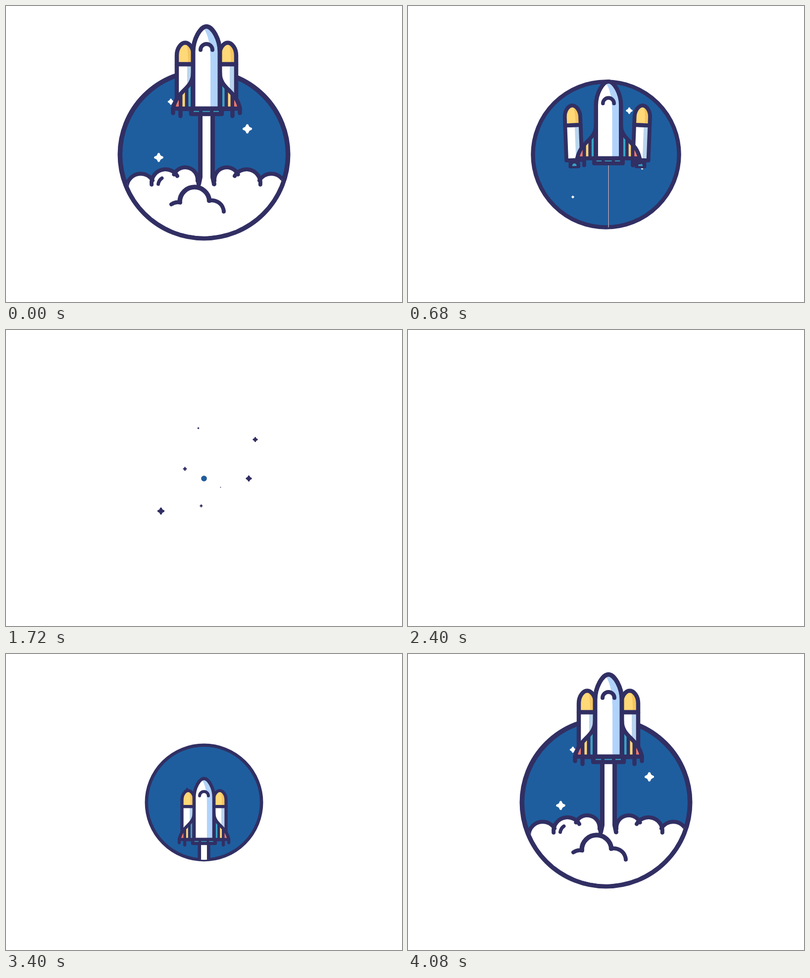
These frames come from a looping animation (800 by 600 pixels, 4.12 s). An HTML page with a canvas:

```html
<!DOCTYPE html>
<html lang="en">
<head>
<meta charset="utf-8">
<title>Shuttle launch</title>
<style>
html, body { margin: 0; width: 100%; height: 100%; overflow: hidden; background: #fff }
canvas { display: block }
</style>
</head>
<body>
<canvas id="stage" width="800" height="600"></canvas>
<script>
const ctx = document.getElementById('stage').getContext('2d');
const NAVY = '#312f63', BLUE = '#1e5e9f', WHITE = '#fff', SKY = '#b1d3fb',
      TEAL = '#36a3c6', RED = '#f4796b', YELLOW = '#ffd877', AMBER = '#f4c55f';
const LOOP = 4120, LAST = 4080, STEP = 40, CX = 400, CY = 301;
const rad = deg => deg * Math.PI / 180;
const ramp = (t, from, to) => Math.min(1, Math.max(0, (t - from) / (to - from)));
const smooth = (t, from, to) => {
  const p = ramp(t, from, to);
  return p * p * (3 - 2 * p);
};

// Smooth monotone curve through [time, value] keys
function track(t, ...keys) {
  const last = keys.length - 1;
  if (t <= keys[0][0]) return keys[0][1];
  if (t >= keys[last][0]) return keys[last][1];
  const slope = i => (keys[i + 1][1] - keys[i][1]) / (keys[i + 1][0] - keys[i][0]);
  const tangent = i => {
    if (i === 0 || i === last) return 0;
    const a = slope(i - 1), b = slope(i);
    return a * b <= 0 ? 0 : 2 * a * b / (a + b);
  };
  const i = keys.findIndex(k => k[0] > t) - 1;
  const [t0, v0] = keys[i], [t1, v1] = keys[i + 1];
  const h = t1 - t0, u = (t - t0) / h, v = 1 - u;
  return v0 * (1 + 2 * u) * v * v + v1 * u * u * (3 - 2 * u) +
    h * u * v * (tangent(i) * v - tangent(i + 1) * u);
}

function fill(path, color) { ctx.fillStyle = color; ctx.fill(path); }
function line(path, width, color = NAVY) {
  ctx.strokeStyle = color;
  ctx.lineWidth = width;
  ctx.stroke(path);
}
function scoped(draw) { ctx.save(); draw(); ctx.restore(); }
function within(path, draw) { scoped(() => { ctx.clip(path); draw(); }); }
function disc(r) {
  const p = new Path2D();
  p.arc(CX, CY, Math.max(r, 0), 0, 2 * Math.PI);
  return p;
}

const SPARK = new Path2D('M0-.72Q.14-.14 .72 0Q.14 .14 0 .72Q-.14 .14-.72 0Q-.14-.14 0-.72Z');
function star(x, y, r, color) {
  if (r < .2) return;
  scoped(() => {
    ctx.translate(x, y);
    ctx.scale(r, r);
    fill(SPARK, color);
    line(SPARK, .54, color);
  });
}

// Stars stream down past the shuttle, swelling mid-way
const drifting = [[333, 194], [487.5, 249], [308.5, 307], [473, 131], [346, -39], [447, 19], [366, 471]];
function drawDrifting(t, radius) {
  for (const [x, y0] of drifting) {
    const y = y0 + .284 * t;
    const r = 10 * radius / 174.5 * Math.sin(Math.PI * ramp(y, 130, 420));
    star(x, y, r, t < -400 ? NAVY : WHITE);
  }
}

// Stars burst outwards, swelling one after another and vanishing together
const burst = [[-87, 66], [90.5, 0], [103.5, -79], [-38.5, -19.5], [-5.7, 55.5], [-11.5, -102], [33.5, 18]];
function drawBurst(t) {
  const reach = track(t, [1400, 0], [1720, 1], [2240, 1.95]);
  burst.forEach(([dx, dy], i) => {
    const size = Math.min(ramp(t - 45 * i, 1400, 1720), ramp(t, 2390, 2230));
    star(CX + dx * reach, CY + dy * reach, 7.3 * size, NAVY);
  });
}

const DOME = new Path2D('M-17 48V30C-17 15-8 4.5 0 4.5S17 15 17 30V48Z');
const DOME_SHADE = new Path2D('M0 0C6 12 6 30 6 48H20V0Z');
const TUBE = new Path2D('M-17 48H17V125H-17Z');
const TUBE_SHADE = new Path2D('M4 48H17V125H4Z');
const NOZZLE = new Path2D('M-8 125H8L9 139H-9Z');
const NOZZLE_GLOW = new Path2D('M-5 138A5 6 0 0 1 5 138Z');
function drawBooster(x, y, scale, angle) {
  scoped(() => {
    ctx.translate(x, y);
    ctx.rotate(angle);
    ctx.scale(scale, scale);
    fill(NOZZLE, NAVY);
    line(NOZZLE, 8);
    fill(NOZZLE_GLOW, TEAL);
    fill(DOME, YELLOW);
    within(DOME, () => fill(DOME_SHADE, AMBER));
    fill(TUBE, WHITE);
    fill(TUBE_SHADE, '#b9d5ee');
    line(DOME, 8.5);
    line(TUBE, 8.5);
  });
}

const BODY = new Path2D('M-27 171V56C-27 30-12 4.5 0 4.5S27 30 27 56V171Z');
const BODY_SHADE = new Path2D('M-7 6C4 20 8 45 8 70V171H30V0Z');
const HATCH = new Path2D('M-12 52A12 12 0 0 1 12 52');
const WING = new Path2D('M-27 98C-27 132-60 133-67.5 171H-27Z');
const LEGS = new Path2D('M-67.5 171V180M-52.5 171V186');
const ENGINE = new Path2D('M-31 171H31V182H-31Z');
const VENTS = new Path2D('M-26 176.7H-15M-8 176.7H7M14 176.7H25');
function stripe(x, width, color) {
  ctx.fillStyle = color;
  ctx.fillRect(x, 98, width, 73);
}
function drawShuttle(x, y, scale) {
  scoped(() => {
    ctx.translate(x, y);
    ctx.scale(scale, scale);
    for (const side of [1, -1]) scoped(() => {
      ctx.scale(side, 1);
      fill(WING, NAVY);
      within(WING, () => {
        stripe(-70, 14, RED);
        stripe(-48.5, 5, YELLOW);
        stripe(-36.5, 4.5, TEAL);
      });
      line(WING, 8.5);
      line(LEGS, 8.5);
    });
    fill(ENGINE, NAVY);
    line(ENGINE, 8.5);
    fill(BODY, WHITE);
    within(BODY, () => fill(BODY_SHADE, SKY));
    line(BODY, 9);
    line(HATCH, 8);
    ctx.lineCap = 'butt';
    line(VENTS, 2, TEAL);
  });
}

function puff(cx, cy, r, from, to) {
  const edge = new Path2D();
  edge.arc(cx, cy, r, rad(from), rad(to));
  const area = new Path2D(edge);
  area.lineTo(cx + r * Math.cos(rad(to)), 900);
  area.lineTo(cx + r * Math.cos(rad(from)), 900);
  return { edge, area };
}

// One bank of puffs, outermost first: x from the middle, y, radius, arc angles
const bank = [[-132, 368, 28, 180, 329], [-82, 359, 28, 174, 329], [-42, 352, 25, 205, 365]];
function drawClouds(drift, fall, gap, bottom) {
  const shrink = 1 - .07 * Math.min(drift, 1);
  const puffs = bank.map(([x, y, r, from, to], i) =>
    puff(x - 2 * (i + 1) * drift, y + 11 * (i + 1) * drift + fall, r * shrink, from, to));
  const slope = `M${-17 - 7 * drift} ${354 + 33 * drift + fall}L${-gap} ${bottom}`;
  const valley = new Path2D(slope + 'H5V900H-60Z');
  for (const side of [1, -1]) scoped(() => {
    ctx.translate(404, 0);
    ctx.scale(side, 1);
    fill(valley, WHITE);
    for (const p of puffs) fill(p.area, WHITE);
    for (const p of puffs) line(p.edge, 8);
    line(new Path2D(slope), 7);
  });
  scoped(() => {
    ctx.translate(-3 * drift, 20 * drift + fall);
    line(new Path2D('M307.5 361Q309 353 315 349'), 7);
  });
}

function drawFrontCloud(drift, fall) {
  const top = puff(381 - drift, 397 + 22 * drift + fall, 30 - Math.min(drift, 1), 180, 355);
  fill(top.area, WHITE);
  scoped(() => {
    ctx.translate(-2 * drift, 15 * drift + fall);
    line(puff(416, 418, 24, 255, 357).edge, 8);
    line(new Path2D('M334 402Q343 396 352 398.5'), 8);
  });
  line(top.edge, 9.5);
}

function drawTrail(x, half, gap, top, bottom, width) {
  const bend = bottom - 14;
  const left = `M${x - half} ${top}V${bend}L${x - gap} ${bottom}`;
  const right = `M${x + half} ${top}V${bend}L${x + gap} ${bottom}`;
  fill(new Path2D(`${left}H${x + gap}L${x + half} ${bend}V${top}Z`), WHITE);
  line(new Path2D(left + right), width);
}

function render(ms) {
  // Launch intro runs on negative time, so the settled pose sits at zero
  let t = Math.floor(ms % LOOP / STEP) * STEP;
  if (t > 3000) t = Math.min(t, LAST) - LAST;

  ctx.fillStyle = WHITE;
  ctx.fillRect(0, 0, 800, 600);
  ctx.lineCap = ctx.lineJoin = 'round';
  drawBurst(t);

  const radius = (1 - smooth(t, 1280, 1780)) * track(t, [-1040, 0], [-680, 119.5], [-480, 164],
    [-320, 179], [0, 174.5], [320, 161.5], [1120, 145.5]);
  if (radius < .3) return;
  const rim = radius * .055, middle = disc(radius - rim / 2), inside = disc(radius - rim + .6);

  fill(middle, BLUE);
  within(middle, () => drawDrifting(t, radius));
  line(middle, rim);

  const shown = 1 - smooth(t, 1280, 1700);
  const scale = shown * track(t, [-1020, 0], [-680, .742], [-300, 1.02], [0, 1], [320, .967], [1120, .912]);
  const tip = CY + shown * (track(t, [-1020, 305], [-680, 249], [-300, 32], [0, 37],
    [320, 91], [560, 137], [1120, 175]) - CY);
  const x = 400 + 5 * smooth(t, -680, -300);

  const drift = Math.max(t, 0) / 320;
  if (t < 900) {
    const fall = 170 * (1 - smooth(t, -620, -120)) + 190 * smooth(t, 320, 820);
    const half = scale * 12.5 * (1 - ramp(t, 0, 700) ** 3);
    const gap = half + 3 - 4 * Math.min(drift, 1), bottom = 361 + 40 * drift + fall;
    within(inside, () => drawClouds(drift, fall, gap, bottom));
    if (half > .5) within(middle, () =>
      drawTrail(x, half, gap, tip + 180 * scale, bottom, Math.min(9 * scale, half)));
    within(inside, () => drawFrontCloud(drift, fall));
  }

  if (scale < .01) return;
  // The shuttle may rise out of the top of the porthole
  const opening = new Path2D(middle);
  opening.rect(310, 0, 180, CY);
  within(opening, () => {
    const parting = (Math.max(t, 0) / 1120) ** 2;
    const axis = x - 5 * smooth(t, 320, 1120);
    for (const side of [-1, 1])
      drawBooster(axis + side * (43 * scale + 85 * parting), tip + 33 * scale + 48 * parting,
        scale * (1 - .04 * parting), side * rad(6 * parting));
    drawShuttle(x, tip, scale);
  });
}

const begin = performance.now();
function tick() {
  render(performance.now() - begin);
  requestAnimationFrame(tick);
}
tick();
</script>
</body>
</html>
```
